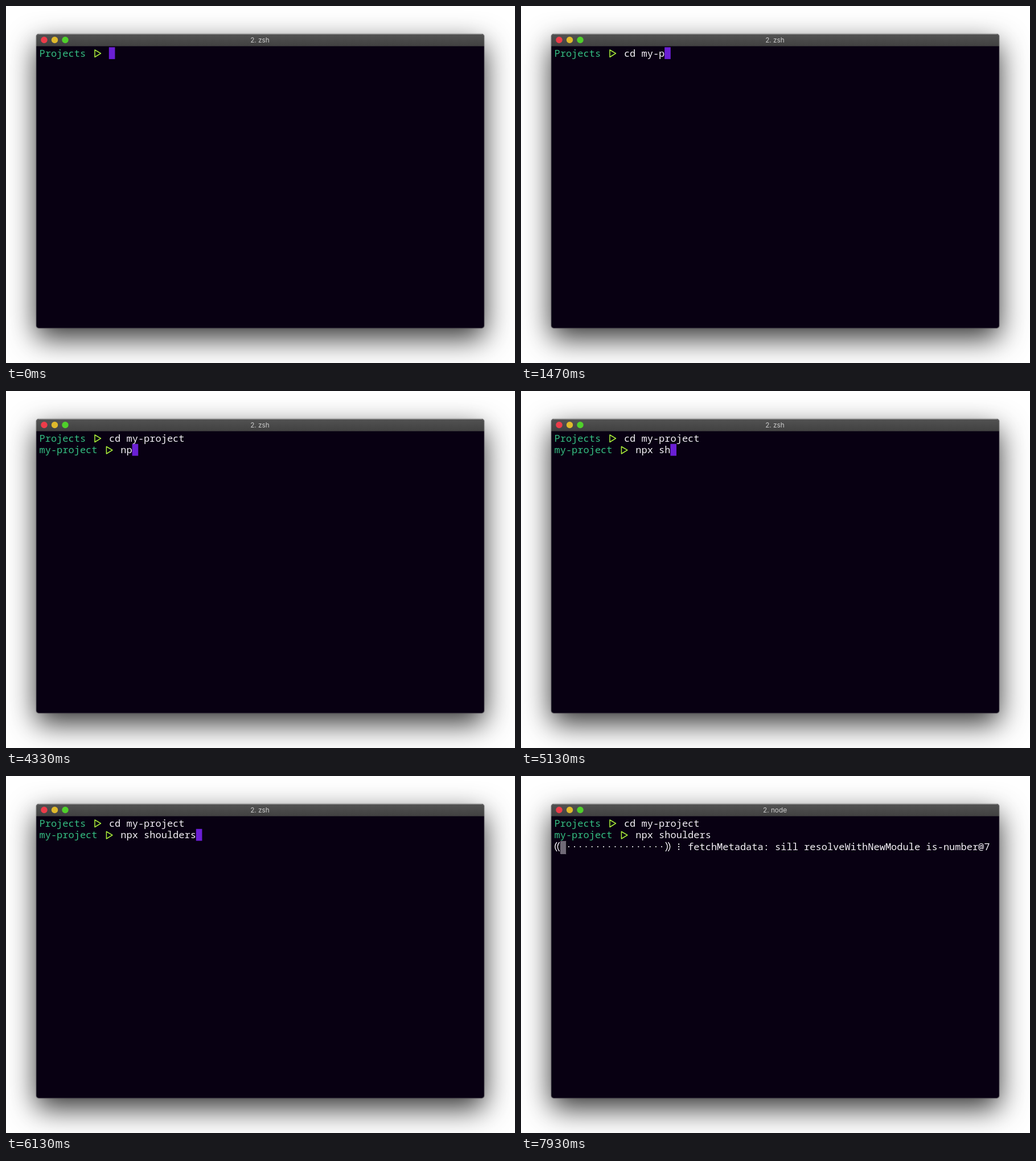
An HTML page that plays this animation: 894 by 626 pixels, repeating every 8000 ms.

```html
<!DOCTYPE html>
<html lang="en">
<head>
<meta charset="utf-8">
<title>Terminal</title>
<style>
html, body { margin: 0; width: 100%; height: 100%; overflow: hidden; background: #fff; }
#window {
  position: absolute; left: 53px; top: 49px; width: 787px; height: 516px;
  border-radius: 5px; background: #080012;
  box-shadow: 0 18px 50px rgba(0,0,0,.8), 0 0 2px rgba(0,0,0,.6);
}
svg { position: absolute; left: 0; top: 0; }
text { white-space: pre; font: 17px "Noto Sans Mono", monospace; fill: #f4f2f6; }
.dir { fill: #35bf83; }
.arrow { fill: none; stroke: #aef23a; stroke-width: 1.5; stroke-linejoin: round; }
#title { font: 11.8px Inter, sans-serif; fill: #cbcbcb; text-anchor: middle; }
</style>
</head>
<body>
<div id="window"></div>
<svg width="894" height="626" viewBox="0 0 894 626">
  <defs>
    <linearGradient id="bar" x2="0" y2="1">
      <stop stop-color="#525252"/><stop offset="1" stop-color="#414141"/>
    </linearGradient>
    <pattern id="shade" width="2" height="2" patternUnits="userSpaceOnUse">
      <path d="M0 0h1v1H0zM1 1h1v1H1z" fill="#d8d5dc"/>
    </pattern>
  </defs>
  <path d="M53 70.5V54a5 5 0 0 1 5-5H835a5 5 0 0 1 5 5V70.5Z" fill="url(#bar)"/>
  <path d="M57 49.5H836" stroke="#777"/>
  <rect x="53.5" y="49.5" width="786" height="515" rx="4.5" fill="none" stroke="#fff" stroke-opacity=".15"/>
  <circle cx="67" cy="59.5" r="5.7" fill="#ed3c4a"/>
  <circle cx="85.5" cy="59.5" r="5.7" fill="#dfb92c"/>
  <circle cx="104" cy="59.5" r="5.7" fill="#4fd02b"/>
  <text id="title" x="446" y="64"></text>

  <text class="dir" x="58.5" y="88.5">Projects</text>
  <path class="arrow" d="M156 77V89.5L166.5 83.2Z"/>
  <text id="cd" x="180.9" y="88.5"></text>

  <g id="prompt">
    <text class="dir" x="58.5" y="109">my-project</text>
    <path class="arrow" d="M176.4 97.5V110L186.9 103.7Z"/>
  </g>
  <text id="npx" x="201.3" y="109"></text>

  <g id="progress">
    <path d="M63 116Q56.5 124 63 132M67.5 116Q61 124 67.5 132M254 116Q260.5 124 254 132M258.5 116Q265 124 258.5 132"
      fill="none" stroke="#f4f2f6" stroke-width="1.4"/>
    <rect x="69" y="114" width="10" height="23" fill="url(#shade)"/>
    <path d="M83 124H250" stroke="#e4e2e8" stroke-width="1.8" stroke-dasharray="1.8 8.4"/>
    <path d="M276 119.5h2.2M276 124h2.2M276 128.5h2.2" stroke="#f4f2f6" stroke-width="2.2"/>
  </g>
  <text id="message" x="293.1" y="129.5">fetchMetadata: sill resolveWithNewModule is-number@7</text>
  <rect id="cursor" width="10.6" height="20.8" fill="#6a1fd4"/>
</svg>
<script>
const LOOP = 8000, CELL = 10.2, ROW = 20.5;
const cdKeys = [400, 530, 670, 800, 930, 1130, 1470];
const npxKeys = [4200, 4330, 4470, 4600, 5000, 5130, 5270, 5330, 5470, 5600, 5800, 5930, 6070];
const TAB = 1670, CD_ENTER = 2600, PROMPT = 2730, NPX_ENTER = 6870;
const NODE = 7600, PROGRESS = 7670, MESSAGE = 7800;

const el = id => document.getElementById(id);
const typed = (text, keys, t) => text.slice(0, keys.filter(k => k <= t).length);
const show = (id, on) => el(id).style.display = on ? "" : "none";

function cursorCell(t, cd, npx) {
  if (t >= NPX_ENTER) return [0, 2];
  if (t >= PROMPT) return [14 + npx.length, 1];
  if (t >= CD_ENTER) return [0, 1];
  return [12 + cd.length, 0];
}

function draw(t) {
  // Tab completion appends a slash that Enter strips again
  const cd = t >= CD_ENTER ? "cd my-project" : t >= TAB ? "cd my-project/" : typed("cd my-p", cdKeys, t);
  const npx = typed("npx shoulders", npxKeys, t);
  const [col, row] = cursorCell(t, cd, npx);
  el("cd").textContent = cd;
  el("npx").textContent = npx;
  el("title").textContent = t >= NODE ? "2. node" : "2. zsh";
  el("cursor").setAttribute("x", 58.4 + col * CELL);
  el("cursor").setAttribute("y", 72.3 + row * ROW);
  show("cursor", t < PROGRESS);
  show("prompt", t >= PROMPT);
  show("progress", t >= PROGRESS);
  show("message", t >= MESSAGE);
}

function frame() {
  draw(performance.now() % LOOP);
  requestAnimationFrame(frame);
}
frame();
</script>
</body>
</html>
```
